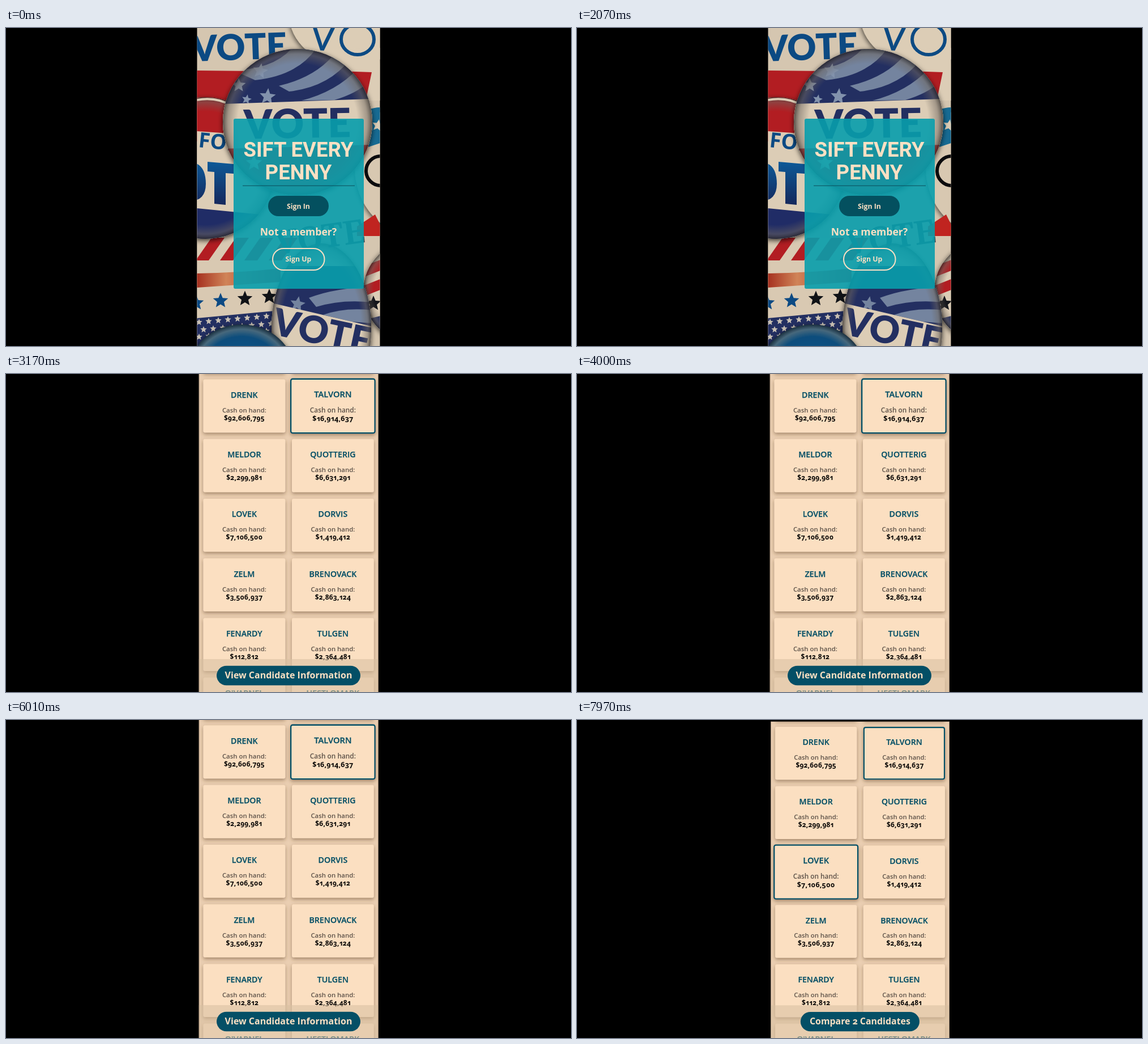
Animation, 998 px wide and 561 px high, one loop 8 s. Source, as an HTML page:

```html
<!DOCTYPE html>
<html lang="en">
<head>
<meta charset="utf-8">
<title>Campaign funds</title>
<style>
html, body { margin: 0; width: 100%; height: 100%; overflow: hidden; background: #000; }
svg { position: absolute; left: 0; top: 0; width: 100%; height: 100%; display: block; }
text { font-family: "Open Sans", "Noto Sans", sans-serif; font-weight: 700; }
.mid { text-anchor: middle; }
.cream { fill: #fbe0c3; }
.print { font-family: Lato, sans-serif; font-weight: 900; }
.thin { font-family: Lato, sans-serif; font-weight: 400; }
.narrow { font-family: "Noto Sans", sans-serif; font-weight: 900; font-stretch: 62.5%; }
.ghost { font-family: "Noto Serif", serif; }
.title { font: 700 36.5px Roboto, sans-serif; }
.name { font-size: 14.2px; font-weight: 600; fill: #044f66; stroke: #044f66; stroke-width: .25px; }
.label { font-size: 11.4px; font-weight: 600; fill: #5c5148; }
.cash { font-size: 12px; fill: #0a0806; letter-spacing: .25px; font-variant-numeric: oldstyle-nums; }
.action { font-size: 16px; font-variant-numeric: oldstyle-nums; }
</style>
</head>
<body>
<svg id="stage" viewBox="0 0 998 561" xmlns="http://www.w3.org/2000/svg">
  <defs>
    <clipPath id="photoClip"><rect x="337.5" width="323" height="561"/></clipPath>
    <clipPath id="listClip"><rect x="340.5" width="317.3" height="561"/></clipPath>
    <clipPath id="mainPin"><ellipse cx="515" cy="166" rx="132" ry="129"/></clipPath>
    <clipPath id="leftPin"><circle cx="352" cy="247" r="125"/></clipPath>
    <clipPath id="lowPin"><ellipse cx="557" cy="530" rx="88" ry="150"/></clipPath>
    <clipPath id="sidePin"><circle cx="722" cy="465" r="91"/></clipPath>
    <radialGradient id="rim">
      <stop offset=".8" stop-color="#6d655e" stop-opacity="0"/>
      <stop offset=".93" stop-color="#6d655e" stop-opacity=".5"/>
      <stop offset="1" stop-color="#2a2624" stop-opacity=".75"/>
    </radialGradient>
    <radialGradient id="dome">
      <stop stop-color="#0d5a90"/><stop offset=".75" stop-color="#0d4d7c"/>
      <stop offset=".9" stop-color="#47687c"/><stop offset="1" stop-color="#1a2f3f"/>
    </radialGradient>
    <linearGradient id="ember">
      <stop stop-color="#a5301f"/><stop offset=".35" stop-color="#d08458"/><stop offset="1" stop-color="#a8251f"/>
    </linearGradient>
    <linearGradient id="ink" gradientUnits="userSpaceOnUse" x1="0" y1="235" x2="0" y2="312">
      <stop stop-color="#0d5a98"/><stop offset="1" stop-color="#15285c"/>
    </linearGradient>
    <filter id="drop" x="-20%" y="-20%" width="140%" height="140%">
      <feDropShadow dx="0" dy="3" stdDeviation="5" flood-color="#000" flood-opacity=".75"/>
    </filter>
    <filter id="lift" x="-20%" y="-20%" width="140%" height="150%">
      <feDropShadow dx="0" dy="3" stdDeviation="3" flood-color="#5c3b20" flood-opacity=".5"/>
    </filter>
  </defs>
</svg>
<script>
const LOOP = 8000, LIST_AT = 3000, COMPARE_AT = 7010;
const NAVY = '#232f61', STEEL = '#74849f', PAPER = '#dccdb6', RED = '#b21d22', BLUE = '#0c4a83';

const candidates = [
  ['DRENK', '92,606,795'], ['TALVORN', '16,914,637'],
  ['MELDOR', '2,299,981'], ['QUOTTERIG', '6,631,291'],
  ['LOVEK', '7,106,500'], ['DORVIS', '1,419,412'],
  ['ZELM', '3,506,937'], ['BRENOVACK', '2,863,124'],
  ['FENARDY', '112,812'], ['TULGEN', '2,364,481'],
  ["O'VARNEL", '1,284,306'], ['HESTLOMARK', '2,045,117']
];

const text = (x, y, str, cls, attrs = '') => `<text x="${x}" y="${y}" class="${cls}" ${attrs}>${str}</text>`;
const tilted = (x, y, str, cls, size, fill, angle) =>
  text(x, y, str, cls, `font-size="${size}" fill="${fill}" transform="rotate(${angle} ${x} ${y})"`);
const path = (d, fill, attrs = '') => `<path d="${d}" fill="${fill}" ${attrs}/>`;
const box = (x, y, w, h, r, fill, attrs = '') =>
  `<rect x="${x}" y="${y}" width="${w}" height="${h}" rx="${r}" fill="${fill}" ${attrs}/>`;
const oval = (cx, cy, rx, ry, fill, attrs = '') =>
  `<ellipse cx="${cx}" cy="${cy}" rx="${rx}" ry="${ry}" fill="${fill}" ${attrs}/>`;
const repeat = (n, draw) => Array.from({ length: n }, (_, i) => draw(i)).join('');

function star(cx, cy, r, fill, turn = 0) {
  const points = Array.from({ length: 10 }, (_, i) => {
    const a = (i * 36 - 90 + turn) * Math.PI / 180, d = i % 2 ? r * .45 : r;
    return `${(cx + d * Math.cos(a)).toFixed(1)},${(cy + d * Math.sin(a)).toFixed(1)}`;
  });
  return `<polygon points="${points.join(' ')}" fill="${fill}"/>`;
}

// A badge: shadowed disc, clipped print, shaded rim.
const badge = (clip, cx, cy, rx, ry, print) =>
  oval(cx, cy, rx, ry, PAPER, 'filter="url(#drop)"') +
  `<g clip-path="url(#${clip})">${print}</g>` + oval(cx, cy, rx, ry, 'url(#rim)');

function backdrop() {
  const topLeft = box(337, 0, 324, 561, 0, '#d5c6b0') +
    tilted(329, 59, 'VOTE', 'print', 63, BLUE, -2) +
    path('M337 75L646 78L634 145L337 200Z', RED);

  const topRight = oval(608, -25, 108, 92, PAPER, 'filter="url(#drop)"') +
    path('M520 40L661 35V128H640Z', PAPER) + path('M560 75L646 78L634 135Z', RED) +
    tilted(534, 38, 'V', 'thin', 72, BLUE, 4) +
    oval(621, 20, 29, 27, 'none', `stroke="${BLUE}" stroke-width="6"`);

  const right = oval(728, 246, 112, 122, '#d8c8b1', 'filter="url(#drop)"') +
    path('M638 145Q650 140 661 140V203L640 210Z', '#176b93') + star(657, 172, 11, PAPER, 10) +
    oval(662, 252, 26, 26, 'none', 'stroke="#0b0b0d" stroke-width="6"') +
    path('M620 350L652 329L661 347V367H620Z', '#c02420');

  const lowerLeft = box(337, 370, 150, 191, 0, '#d9c9b2') +
    repeat(4, i => path(`M${335 + i * 43} 410L${363 + i * 43} 370H${386 + i * 43}L${358 + i * 43} 410Z`, RED)) +
    path('M337 433Q410 432 485 424V448L337 458Z', 'url(#ember)') +
    path('M337 512L485 498V561H337Z', NAVY) +
    repeat(27, i => star(341 + i % 9 * 17 + (i / 9 | 0) % 2 * 8, 519 + (i / 9 | 0) * 13 - i % 9 * 1.5, 6, '#c9c1b4')) +
    repeat(4, i => star(336 + i * 43, 485 - i * 3.7, 14, i < 2 ? BLUE : '#101216'));

  const side = badge('sidePin', 722, 465, 91, 91,
    repeat(3, i => path(`M625 ${389 + i * 34}L661 ${375 + i * 34}V${394 + i * 34}L625 ${408 + i * 34}Z`, RED)) +
    star(649, 486, 14, '#14161b') + path('M620 518L661 508V561H620Z', NAVY) +
    repeat(4, i => star(645 + i % 2 * 10, 523 + i * 9, 5, PAPER)));

  const low = badge('lowPin', 557, 530, 88, 150,
    box(460, 365, 204, 200, 0, NAVY) + box(460, 365, 204, 55, 0, PAPER) +
    path('M535 476Q590 455 662 458V486Q600 476 548 492Z', STEEL) +
    path('M560 506Q605 490 662 500V522L610 518Z', STEEL) + star(515, 487, 14, STEEL, 10) +
    path('M465 484L662 530V590H465Z', PAPER) +
    tilted(468, 540, 'VOTE', 'print', 66, NAVY, 12));

  const left = badge('leftPin', 352, 247, 125, 125,
    box(337, 120, 150, 80, 0, RED) +
    path('M337 182L480 192V330L337 319Z', PAPER) +
    path('M337 318L480 332V390H337Z', '#202c66') +
    tilted(339, 210, 'FORG', 'narrow', 37, BLUE, 6) +
    path('M325 245Q345 245 345 275Q345 298 325 297', 'none', 'stroke="url(#ink)" stroke-width="16"') +
    path('M356 236L402 240V257L388 256V312L368 310V254L356 253Z', 'url(#ink)')) +
    path('M337 127Q372 121 398 137', 'none', `stroke="${PAPER}" stroke-width="4"`);

  const main = badge('mainPin', 515, 166, 132, 129,
    box(380, 30, 270, 104, 0, NAVY) +
    path('M400 74Q470 74 505 36H548Q515 84 440 92Z', STEEL) +
    path('M482 102Q550 86 583 42L607 56Q570 104 500 112Z', STEEL) +
    path('M522 128Q584 112 621 72L640 96Q618 116 580 127Z', STEEL) +
    [[449, 76, 14, 10], [462, 121, 15, 5], [411, 101, 13, 0], [425, 126, 9, 12]]
      .map(([x, y, r, turn]) => star(x, y, r, '#8292ac', turn)).join('') +
    path('M380 134L650 125V208L380 213Z', PAPER) +
    text(515, 194, 'VOTE', 'print mid', `font-size="71" fill="${NAVY}" transform="rotate(-1 515 194)"`) +
    path('M380 213L650 206V300H380Z', RED) + star(438, 238, 15, PAPER));

  return `<g clip-path="url(#photoClip)">${topLeft}${topRight}${right}${lowerLeft}${side}${low}${left}` +
    tilted(478, 400, 'VOTE', 'ghost', 58, '#3c4a52', -8) + main +
    oval(416, 608, 94, 85, 'url(#dome)', 'filter="url(#drop)"') + '</g>';
}

function welcome() {
  return backdrop() + box(402, 160, 230, 300, 3, '#089eac', 'fill-opacity=".9"') +
    text(516.5, 227, 'SIFT EVERY', 'title mid cream') + text(516.5, 267, 'PENNY', 'title mid cream') +
    box(418, 277.7, 198, 1, 0, '#0a4d5b') +
    box(463, 296, 107, 36, 18, '#04505f') + text(516.5, 318.5, 'Sign In', 'mid cream', 'font-size="12.3"') +
    text(516.5, 366.3, 'Not a member?', 'mid cream', 'font-size="17.6"') +
    box(471, 389, 91.5, 38, 19, 'none', 'stroke="#fbe0c3" stroke-width="2"') +
    text(516.5, 412, 'Sign Up', 'mid cream', 'font-size="12.3"');
}

function card(i, picked, raised) {
  const x = i % 2 ? 505 : 348.5, y = 9.6 + Math.floor(i / 2) * 105.2, cx = x + 72.4, cy = y + 46.8;
  const edge = picked ? 'stroke="#044f66" stroke-width="2.2"' : '';
  const inset = picked ? 1 : 0;
  const [name, cash] = candidates[i] || [];
  const words = name ? text(cx, y + 32.4, name, 'name mid') +
    text(cx, y + 58.3, 'Cash on hand:', 'label mid') + text(cx, y + 72.4, '$' + cash, 'cash mid') : '';
  return `<g transform="translate(${cx} ${cy}) scale(${raised ? 1.04 : 1}) translate(${-cx} ${-cy})">` +
    box(x + inset, y + inset, 144.8 - 2 * inset, 93.6 - 2 * inset, 3, '#fbdfc1', edge + ' filter="url(#lift)"') +
    words + '</g>';
}

function list(picked, raised, action, buttonWidth) {
  let cards = '';
  // The two blank cards before the first row only show their lower edge.
  for (let i = -2; i < candidates.length; i++)
    if (i !== raised) cards += card(i, picked.includes(i), false);
  cards += card(raised, true, true);
  return '<g clip-path="url(#listClip)">' + box(340.5, 0, 317.3, 561, 0, '#ebcfb2') + cards +
    box(340.5, 503, 317.3, 58, 0, '#d9c1a2', 'fill-opacity=".58"') +
    box(340.5, 0, 1, 561, 0, '#a58d77') + box(656.8, 0, 1, 561, 0, '#a58d77') +
    box(499 - buttonWidth / 2, 514.7, buttonWidth, 34.6, 17.3, '#044f66') +
    text(499, 537.4, action, 'action mid cream') + '</g>';
}

const stage = document.getElementById('stage');
stage.insertAdjacentHTML('beforeend',
  `<g>${welcome()}</g>` +
  `<g>${list([1], 1, 'View Candidate Information', 254)}</g>` +
  `<g><g transform="translate(499.9 561) scale(.9955) translate(-499 -561)">${list([1, 4], 4, 'Compare 2 Candidates', 211)}</g></g>`);

const scenes = [...stage.children].slice(1);
const start = performance.now();

function show(now) {
  const t = Math.max(0, now - start) % LOOP;
  const current = t < LIST_AT ? 0 : t < COMPARE_AT ? 1 : 2;
  scenes.forEach((scene, i) => { scene.style.display = i === current ? '' : 'none'; });
  requestAnimationFrame(show);
}
show(start);
</script>
</body>
</html>
```
